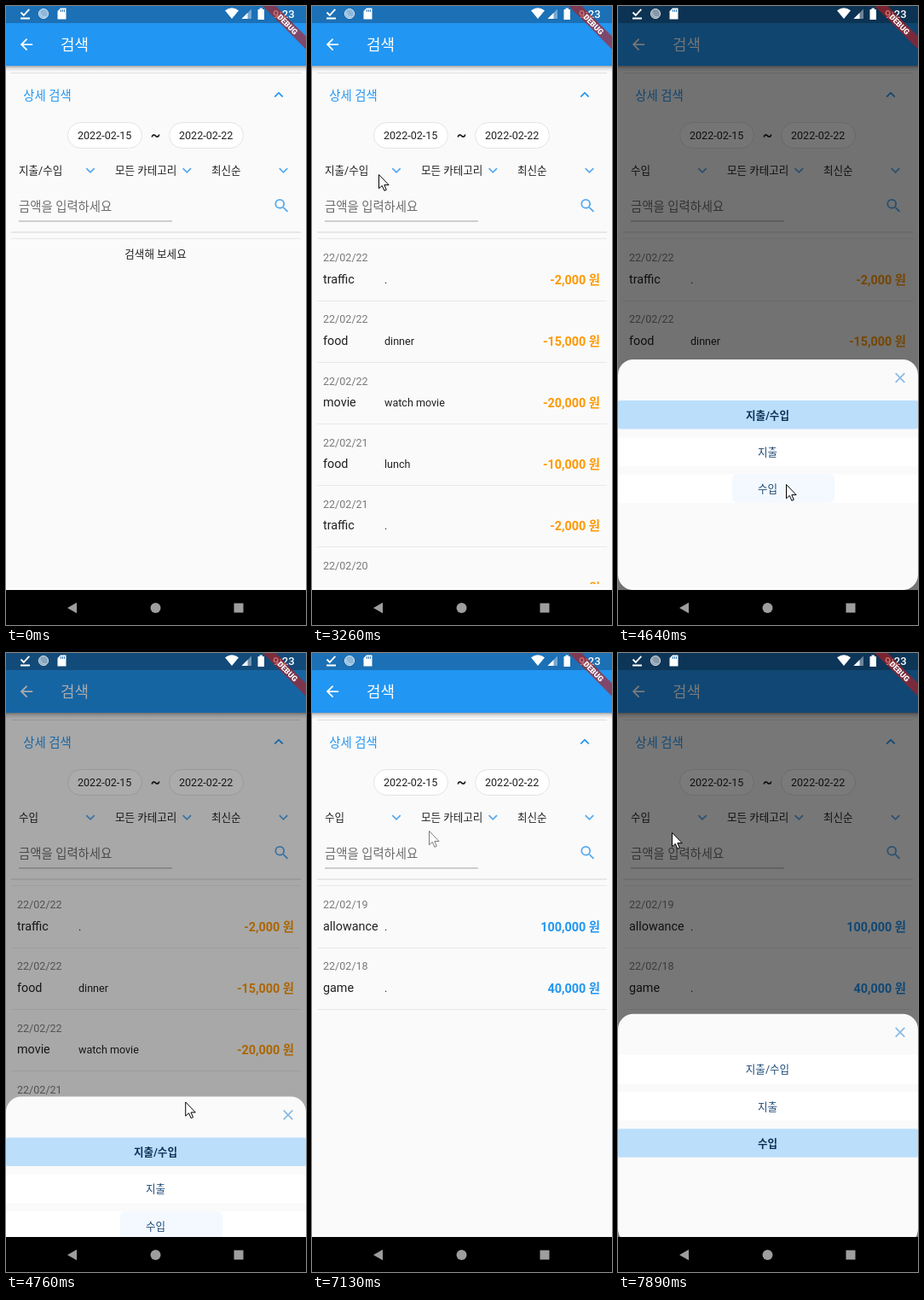
Write an HTML page that moves like this. It is 352 by 725 pixels and loops after 8000 ms.

```html
<!DOCTYPE html>
<html lang="ko">
<head>
<meta charset="utf-8">
<style>
html, body { margin: 0; width: 100%; height: 100%; overflow: hidden; background: #fafafa; }
svg { display: block; width: 352px; height: 725px; }
text { font-family: Roboto, 'Noto Sans CJK KR', 'Noto Sans CJK', 'Noto Sans', sans-serif; white-space: pre; }
</style>
</head>
<body>
<svg id="stage" viewBox="0 0 352 725" xmlns="http://www.w3.org/2000/svg">
  <defs>
    <linearGradient id="shadow" x1="0" y1="0" x2="0" y2="1">
      <stop offset="0" stop-opacity=".34"/>
      <stop offset=".4" stop-opacity=".12"/>
      <stop offset="1" stop-opacity="0"/>
    </linearGradient>
    <clipPath id="listArea"><rect y="266" width="352" height="411"/></clipPath>
    <clipPath id="screen"><rect width="352" height="684"/></clipPath>
  </defs>
  <rect width="352" height="725" fill="#fafafa"/>
  <g id="page"></g>
  <g id="list" clip-path="url(#listArea)"></g>
  <rect id="scrim" width="352" height="684"/>
  <g clip-path="url(#screen)"><g id="sheet"></g></g>
  <g id="system"></g>
  <path id="cursor" d="M0 0V16.3L3.8 12.9 6.4 18.8 8.8 17.8 6.3 12.1H11.6Z" fill="#fff" stroke="#000"/>
</svg>
<script>
const LOOP = 8000, STEP = 125;
const SMALL = 12.56, MEDIUM = 14.36, LARGE = 17.95;
const BLUE = '#2196f3', ORANGE = '#ff9800', LIGHT = '#58aaf0';
const SHEET_TOP = 414, SHEET_HEIGHT = 270, BOTTOM = 684;
const FILTERS = ['지출/수입', '지출', '수입'];

const $ = id => document.getElementById(id);
const clamp = v => Math.max(0, Math.min(1, v));
const smooth = v => v * v * (3 - 2 * v);
const decelerate = v => 1 - (1 - v) ** 2;

const text = (x, y, str, size = SMALL, fill = '#212121', extra = '') =>
  `<text x="${x}" y="${y}" font-size="${size}" fill="${fill}" ${extra}>${str}</text>`;
const rect = (x, y, w, h, fill, extra = '') =>
  `<rect x="${x}" y="${y}" width="${w}" height="${h}" fill="${fill}" ${extra}/>`;
const path = (d, fill, extra = '') => `<path d="${d}" fill="${fill}" ${extra}/>`;
const icon = (x, y, d, fill) => path(d, fill, `transform="translate(${x} ${y}) scale(.897)"`);
const chevron = (x, y, dir, color) =>
  path(`M${x - 4.7} ${y - 2.4 * dir}l4.7 ${4.7 * dir} 4.7 ${-4.7 * dir}`, 'none', `stroke="${color}" stroke-width="1.8"`);
const divider = (y, color = '#e9e9e9') => rect(6, y, 340, 1, color);
const chip = (x, date) =>
  rect(x + .5, 136.5, 87, 30, '#fff', 'rx="15" stroke="#e4e4e4"') + text(x + 12, 156, date);

const EXPENSES = [
  ['22/02/22', 'traffic', '.', '-2,000 원'],
  ['22/02/22', 'food', 'dinner', '-15,000 원'],
  ['22/02/22', 'movie', 'watch movie', '-20,000 원'],
  ['22/02/21', 'food', 'lunch', '-10,000 원'],
  ['22/02/21', 'traffic', '.', '-2,000 원'],
  ['22/02/20', '', '', '원']
];
const INCOME = [
  ['22/02/19', 'allowance', '.', '100,000 원'],
  ['22/02/18', 'game', '.', '40,000 원']
];

const rows = (items, color) => items.map(([date, category, memo, amount], i) => {
  const y = 272 + 72.1 * i;
  return text(13, y + 27.3, date, SMALL, '#7a7a7a') +
    text(13, y + 53, category, MEDIUM) +
    text(85, y + 52.6, memo) +
    text(338, y + 54, amount, MEDIUM, color, 'font-weight="700" text-anchor="end"') +
    divider(Math.round(y + 72.5));
}).join('');

const LISTS = {
  empty: text(175.5, 294.5, '검색해 보세요', SMALL, '#212121', 'text-anchor="middle"'),
  expenses: rows(EXPENSES, ORANGE),
  income: rows(INCOME, BLUE)
};

const SEARCH = 'M15.5 14h-.79l-.28-.27A6.47 6.47 0 0 0 16 9.5 6.5 6.5 0 1 0 9.5 16c1.61 0 3.09-.59 4.23-1.57l.27.28v.79l5 4.99L20.49 19zm-6 0a4.5 4.5 0 1 1 0-9 4.5 4.5 0 0 1 0 9z';
const BACK = 'M20 11H7.83l5.59-5.59L12 4l-8 8 8 8 1.41-1.41L7.83 13H20z';

function drawPage() {
  $('page').innerHTML =
    rect(0, 70, 352, 7, 'url(#shadow)') +
    rect(0, 0, 352, 70, BLUE) + rect(0, 0, 352, 20, '#1b70b6') +
    icon(13.2, 34.3, BACK, '#fff') +
    text(64, 52, '검색', LARGE, '#fff', 'font-weight="500"') +
    divider(78, '#dedede') +
    text(20.3, 110, '상세 검색', MEDIUM, BLUE) + chevron(320, 104, -1, BLUE) +
    chip(72, '2022-02-15') + chip(191, '2022-02-22') +
    text(175.5, 158, '~', LARGE, '#212121', 'text-anchor="middle" font-weight="500"') +
    rect(6, 181, 113, 22.5, '#000', 'id="press" opacity=".07"') +
    text(15, 197.2, FILTERS[0], SMALL, '#212121', 'id="filter"') +
    text(128, 197.2, '모든 카테고리') + text(241, 197.2, '최신순') +
    [99, 212.3, 325.5].map(x => chevron(x, 192.5, 1, LIGHT)).join('') +
    text(15, 240, '금액을 입력하세요', MEDIUM, '#6c6c6c') +
    rect(15, 251.5, 180, 1, '#a4a4a4') +
    icon(312.7, 223.2, SEARCH, LIGHT) +
    divider(264.5, '#d6d6d6') + divider(272);
}

function drawSystem() {
  const white = '#fff', grey = '#9e9e9e';
  $('system').innerHTML =
    path('M17.5 7.5l3.3 3.3 6.5-7M17 14.5h11', 'none', 'stroke="#fff" stroke-width="1.9"') +
    '<circle cx="44" cy="9" r="5.6" fill="#fff" fill-opacity=".5" stroke="#fff" stroke-opacity=".75"/>' +
    path('M40.5 6a5 5 0 0 0 7 6.4 5.6 5.6 0 0 1-7-6.4z', white, 'opacity=".6"') +
    path('M64 2.5h6.5v13h-10v-9.5z', white) +
    path('M64.5 4v3M66.5 4v3M68.5 4v3', 'none', 'stroke="#1b70b6" stroke-width=".9"') +
    path('M257 5.2Q265 -.6 273 5.2L265 15z', white) +
    path('M288 3.5V15H276.5z', white, 'opacity=".4"') + path('M283.5 8V15H276.5z', white) +
    path('M297.5 2.5h3.5v1.5h2v12h-7.5v-12h2z', white) +
    text(313, 14, '9:23', 13, white, 'font-weight="500"') +
    '<g clip-path="url(#screen)"><g transform="translate(352 0) rotate(45)">' +
    rect(-36, 25.1, 72, 10.8, '#b71c1c', 'fill-opacity=".63"') +
    text(0, 33.8, 'DEBUG', 9.1, white, 'font-weight="900" text-anchor="middle"') + '</g></g>' +
    rect(0, BOTTOM, 352, 41, '#000') +
    path('M72 705l11-6.2v12.4z', grey) +
    `<circle cx="175.5" cy="705" r="6" fill="${grey}"/>` +
    rect(267.5, 699.5, 11, 11, grey);
}

function drawSheet(selected, ripple) {
  const options = FILTERS.map((name, i) => {
    const y = 48 + 43.3 * i, on = i === selected;
    const splash = i === 2 && ripple ? rect(194 - ripple, y, 2 * ripple, 33.5, '#f3f9ff', 'rx="6"') : '';
    return rect(0, y, 352, 33.5, on ? '#bbdefb' : '#fff', 'rx="2"') + splash +
      text(175.5, y + 21.5, name, SMALL, on ? '#0c3358' : '#1c4a76', `text-anchor="middle" font-weight="${on ? 700 : 400}"`);
  });
  return rect(0, 0, 352, SHEET_HEIGHT, '#fafafa', 'rx="18"') +
    path('M325.7 16.2l10.6 10.6M336.3 16.2l-10.6 10.6', 'none', 'stroke="#8abbe4" stroke-width="1.8"') +
    options.join('');
}

// Each move: start, end, from x, y, to x, y
const MOVES = [
  [1125, 2000, 309, 248, 325, 235],
  [2500, 3250, 326, 236, 78, 197],
  [3625, 4375, 78, 197, 197, 560],
  [4625, 5250, 197, 560, 324, 228],
  [7000, 7125, 324, 228, 137, 208],
  [7125, 7375, 137, 208, 63, 210]
];

function cursorAt(t) {
  const [start, end, x0, y0, x1, y1] = MOVES.filter(m => m[0] <= t).pop() || MOVES[0];
  const p = smooth(clamp((t - start) / (end - start)));
  return [x0 + (x1 - x0) * p, y0 + (y1 - y0) * p];
}

function sheetOpen(t) {
  const opening = start => decelerate(clamp((t - start) / 250));
  if (t >= 7670) return opening(7670);
  if (t >= 4625) return decelerate(clamp(1 - (t - 4625) / 200));
  return opening(3495);
}

function render(now) {
  const t = Math.floor((now % LOOP) / STEP) * STEP;
  const open = sheetOpen(t);
  const list = t < 2125 ? 'empty' : t < 5500 ? 'expenses' : 'income';
  if ($('list').dataset.name !== list) {
    $('list').dataset.name = list;
    $('list').innerHTML = LISTS[list];
  }
  $('filter').textContent = FILTERS[t < 4625 ? 0 : 2];
  $('press').style.display = t === 3625 ? '' : 'none';
  $('scrim').setAttribute('opacity', .54 * open);

  const ripple = t < 4500 || t > 4750 ? 0 : t === 4500 ? 25 : 60;
  $('sheet').innerHTML = open ? drawSheet(t < 5000 ? 0 : 2, ripple) : '';
  $('sheet').setAttribute('transform', `translate(0 ${BOTTOM - (BOTTOM - SHEET_TOP) * open})`);

  const [x, y] = cursorAt(t);
  $('cursor').setAttribute('transform', `translate(${x + .5} ${y + .5})`);
  $('cursor').setAttribute('opacity', t < 1250 ? 0 : t === 7125 ? .5 : 1);
}

drawPage();
drawSystem();
const begin = performance.now();
function tick() {
  render(performance.now() - begin);
  requestAnimationFrame(tick);
}
tick();
</script>
</body>
</html>
```
